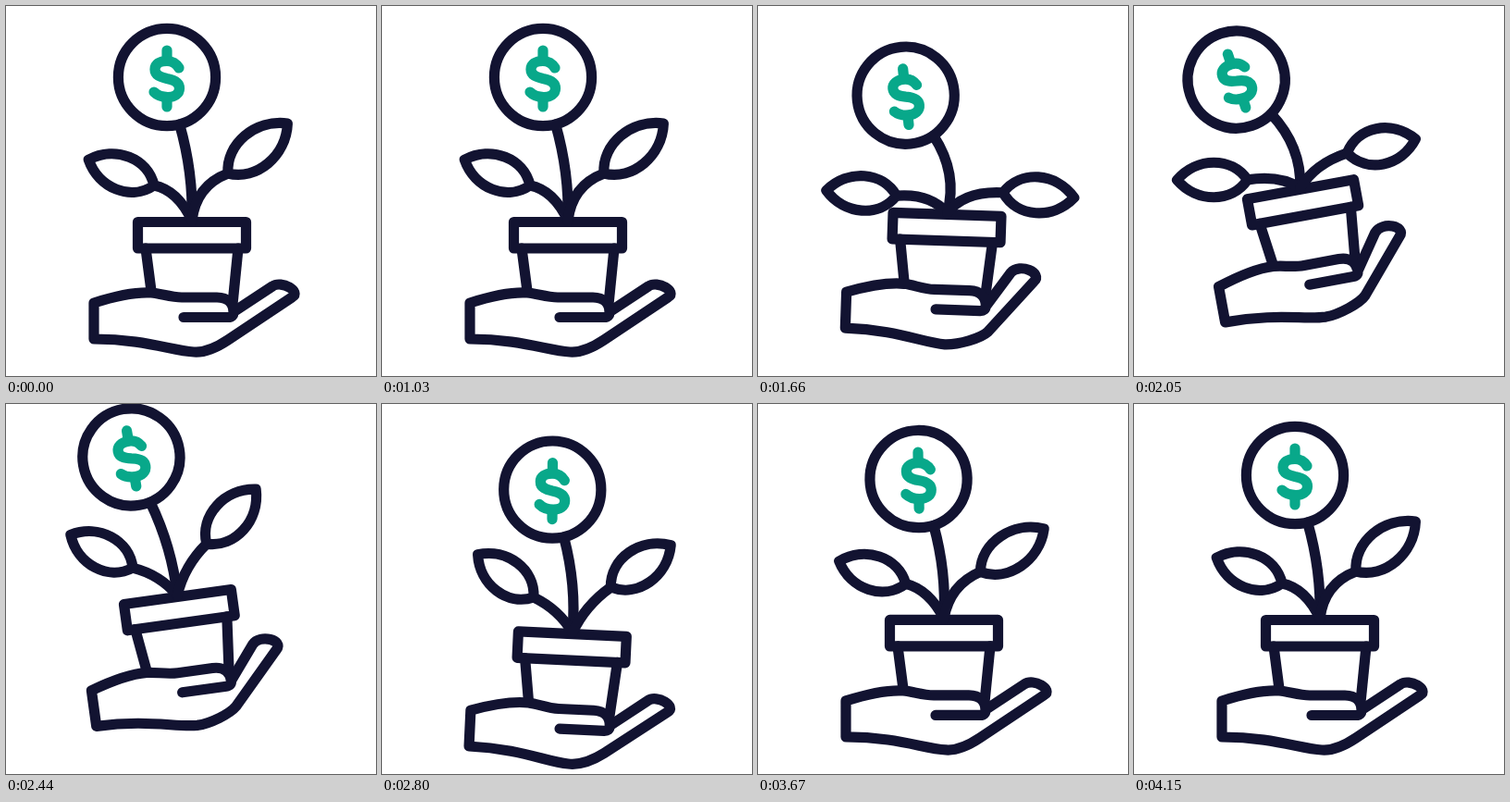
Animation of 400 by 400 pixels, one loop 4.18 s. Source, as an HTML page with a canvas:

```html
<!DOCTYPE html>
<html lang="en">
<head>
<meta charset="utf-8">
<title>Growing money</title>
<style>
html, body { margin: 0; width: 100%; height: 100%; overflow: hidden; background: #fff; }
canvas { display: block; width: 100vmin; height: 100vmin; }
</style>
</head>
<body>
<canvas id="stage"></canvas>
<script>
const LOOP = 4180, START = 1030, NAVY = '#121331', GREEN = '#08a88a';
const canvas = document.getElementById('stage');
const ctx = canvas.getContext('2d');
const rad = deg => deg * Math.PI / 180;
const mix = (a, b, k) => a + (b - a) * k;

// A swing lists only its turning points as [time, value]; a cosine joins them.
function swing(...turns) {
  return t => {
    let [t0, v0] = [START, 0];
    for (const [t1, v1] of turns) {
      if (t < t1) {
        const u = Math.max(0, (t - t0) / (t1 - t0));
        return mix(v0, v1, (1 - Math.cos(Math.PI * u)) / 2);
      }
      [t0, v0] = [t1, v1];
    }
    return v0;
  };
}

const tiltAt = swing([1490, 4.5], [2130, -11], [2250, -11], [2860, 3], [3400, -0.5], [3690, 0]);
const sinkAt = swing([1360, 11], [1680, -12], [2100, -18], [2250, -18], [2850, 10.5], [3290, -9.5], [3690, 0]);
const curlAt = swing([1380, 0], [1660, 1], [2250, 1], [2980, 0]);
const droopAt = swing([1360, -0.06], [1690, 1], [1930, 1.05], [2430, 0], [2740, 0], [3140, 0.98], [3430, -0.03], [3690, 0.14], [4150, 0]);
// upward flick of the leaves while the plant is pressed down
const flickAt = swing([1360, 0.5], [1720, 0], [2400, 0.9], [2850, 0.9], [3120, 0], [3290, 0.9], [3650, 0]);

function line(x1, y1, x2, y2) {
  ctx.beginPath();
  ctx.moveTo(x1, y1);
  ctx.lineTo(x2, y2);
  ctx.stroke();
}

function bow(x, y, cx, cy) {
  ctx.beginPath();
  ctx.moveTo(x, y);
  ctx.quadraticCurveTo(cx, cy, 0, 0);
  ctx.stroke();
}

function leaf(x, y, deg, len, w) {
  ctx.save();
  ctx.translate(x, y);
  ctx.rotate(rad(deg));
  ctx.beginPath();
  ctx.moveTo(0, 0);
  ctx.bezierCurveTo(len * 0.22, -w, len * 0.72, -w, len, 0);
  ctx.bezierCurveTo(len * 0.72, w, len * 0.22, w, 0, 0);
  ctx.closePath();
  ctx.stroke();
  ctx.restore();
}

function coin(x, y, deg) {
  ctx.save();
  ctx.translate(x, y);
  ctx.rotate(rad(deg));
  ctx.beginPath();
  ctx.arc(0, 0, 52.6, 0, 7);
  ctx.stroke();
  ctx.strokeStyle = GREEN;
  line(0, -29, 0, -18);
  line(0, 22, 0, 32);
  ctx.beginPath();
  ctx.moveTo(13, -10);
  ctx.bezierCurveTo(10, -15, 5, -17.5, 0, -17.5);
  ctx.bezierCurveTo(-8, -17.5, -13, -14, -13, -8.5);
  ctx.bezierCurveTo(-13, -2, -7, 0, 0, 1.5);
  ctx.bezierCurveTo(8, 3, 13.5, 5.5, 13.5, 12);
  ctx.bezierCurveTo(13.5, 18, 8, 21.5, 1, 21.5);
  ctx.bezierCurveTo(-6, 21.5, -11, 19, -14, 16);
  ctx.stroke();
  ctx.restore();
}

// Everything on the plant follows its droop and flick, measured from the root.
function plant(droop, flick) {
  const d2 = droop * droop;
  ctx.save();
  ctx.translate(201, 232);

  const x = -27 - 23 * d2 - 2 * flick, y = -155 + 30 * droop, grip = rad(75 - 22 * droop);
  bow(x + 53 * Math.cos(grip), y + 53 * Math.sin(grip), 1.5 + 9 * droop, -52 + 9 * droop);
  coin(x, y, -8 * droop - 2 * flick);

  const lx = -41 - 15 * d2 - 3 * flick, ly = -38 + 22 * d2 + 2 * flick;
  bow(lx, ly, -15.5 - 4 * droop, -33 + 12 * droop + 9 * flick);
  leaf(lx, ly, 201.5 - 20 * droop + 16 * flick, 76, 25);

  const rx = 39 + 21.5 * d2, ry = -51 + 28 * d2;
  bow(rx, ry, 4.5 + 13 * droop + 8 * flick, -38 + 13 * droop + 8 * flick);
  leaf(rx, ry, -40 + 43 * droop, 84 - 7 * droop - 5 * flick, 26);
  ctx.restore();
}

function pot() {
  line(151, 262, 157, 308);
  line(251, 262, 245, 322);
  ctx.strokeRect(142.5, 233.5, 117, 28.5);
}

function hand(curl) {
  const m = (open, bent) => mix(open, bent, curl);
  ctx.beginPath();
  ctx.moveTo(247, 330);
  ctx.lineTo(m(288, 272), m(303, 294));
  ctx.bezierCurveTo(m(298, 281), m(296, 283), m(320, 307), m(309, 293), m(309, 297), m(315, 303));
  ctx.lineTo(m(240, 249), m(361, 359));
  ctx.bezierCurveTo(m(228, 242), m(369, 366), m(215, 218), m(375, 374), 203, 374);
  ctx.bezierCurveTo(180, 373, 150, 360, 95, 360);
  ctx.lineTo(95, 321);
  ctx.bezierCurveTo(120, 313, 140, 309, 157, 310);
  ctx.bezierCurveTo(168, 311, 178, 315, 190, 315);
  ctx.lineTo(228, 315);
  ctx.bezierCurveTo(240, 315, 246, 322, 246, 331);
  ctx.quadraticCurveTo(246, 336.5, 240, 336.5);
  ctx.lineTo(192, 336.5);
  ctx.stroke();
}

function draw(t) {
  const size = Math.round(Math.min(innerWidth, innerHeight) * (window.devicePixelRatio || 1)) || 400;
  if (canvas.width !== size) canvas.width = canvas.height = size;
  ctx.setTransform(size / 400, 0, 0, size / 400, 0, 0);
  ctx.fillStyle = '#fff';
  ctx.fillRect(0, 0, 400, 400);
  ctx.lineWidth = 11.2;
  ctx.lineCap = ctx.lineJoin = 'round';
  ctx.strokeStyle = NAVY;
  // the wrist is the pivot
  ctx.translate(95, 340 + sinkAt(t));
  ctx.rotate(rad(tiltAt(t)));
  ctx.translate(-95, -340);
  pot();
  hand(curlAt(t));
  plant(droopAt(t), flickAt(t));
}

const start = performance.now();
function tick() {
  draw((performance.now() - start) % LOOP);
  requestAnimationFrame(tick);
}
tick();
</script>
</body>
</html>
```
